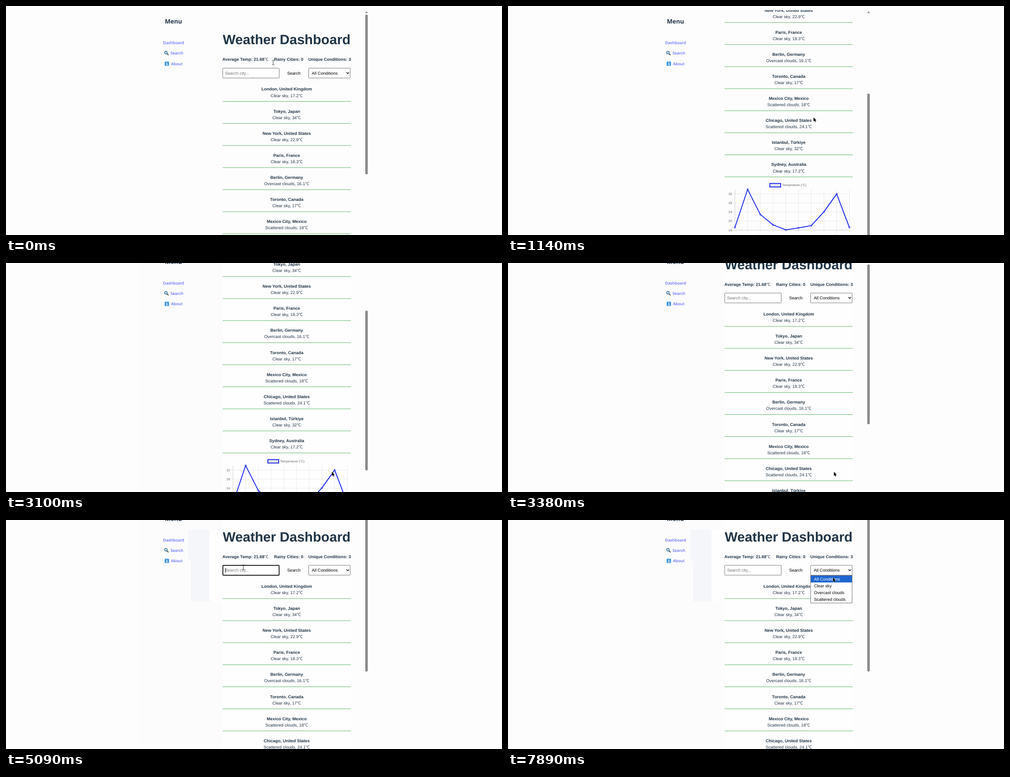
Animation, 1099 px wide and 510 px high, one loop 8000 ms. Source, as an HTML page:

```html
<!DOCTYPE html>
<html lang="en">
<head>
<meta charset="utf-8">
<title>Weather Dashboard</title>
<style>
  html, body { margin: 0; width: 100%; height: 100%; overflow: hidden; background: #fdfdfd; }
  svg { display: block; }
  text { font-family: "Liberation Sans", Arial, "Noto Sans CJK JP", sans-serif; font-size: 9.4px; fill: #213547; text-rendering: geometricPrecision; white-space: pre; }
  .bold { font-weight: 700; }
  .mid { text-anchor: middle; }
  .end { text-anchor: end; }
  .title { font-size: 30.05px; font-weight: 700; }
  .unit { font-family: "Noto Sans CJK JP", "DejaVu Sans", sans-serif; font-weight: 400; }
  .menu { font-family: "Open Sans", "Noto Sans", sans-serif; font-size: 13.4px; font-weight: 700; text-anchor: middle; }
  .link { font-family: "Open Sans", "Noto Sans", sans-serif; font-size: 8.8px; font-weight: 600; fill: #646cff; }
  .control { fill: #000; }
  .hint { fill: #757575; }
  .small { font-size: 7.03px; fill: #666; }
  .picked { fill: #fff; }
</style>
</head>
<body>
<svg id="stage" xmlns="http://www.w3.org/2000/svg" width="1099" height="510" viewBox="0 0 1099 510"></svg>
<script>
const LOOP = 8000;
const PAGE_SCROLL = 37.5;
const CITIES = [
  ["London", "United Kingdom", "Clear sky", 17.2],
  ["Tokyo", "Japan", "Clear sky", 34],
  ["New York", "United States", "Clear sky", 22.9],
  ["Paris", "France", "Clear sky", 18.3],
  ["Berlin", "Germany", "Overcast clouds", 16.1],
  ["Toronto", "Canada", "Clear sky", 17],
  ["Mexico City", "Mexico", "Scattered clouds", 18],
  ["Chicago", "United States", "Scattered clouds", 24.1],
  ["Istanbul", "Türkiye", "Clear sky", 32],
  ["Sydney", "Australia", "Clear sky", 17.2]
];

const stage = document.getElementById("stage");

function add(parent, tag, attrs = {}, content) {
  const node = document.createElementNS("http://www.w3.org/2000/svg", tag);
  for (const key in attrs) node.setAttribute(key, attrs[key]);
  if (content !== undefined) node.textContent = content;
  parent.appendChild(node);
  return node;
}
const group = (parent, attrs) => add(parent, "g", attrs);
const text = (parent, x, y, cls, content) => add(parent, "text", { x, y, class: cls }, content);
const rect = (parent, x, y, width, height, attrs) => add(parent, "rect", { x, y, width, height, ...attrs });
const path = (parent, d, attrs) => add(parent, "path", { d, fill: "none", ...attrs });

function degrees(parent, x, y, cls, content) {
  add(text(parent, x, y, cls, content), "tspan", { class: "unit" }, "℃");
}

function buildSidebar(g) {
  text(g, 371, 39, "menu", "Menu");
  text(g, 348, 85, "link", "Dashboard");
  text(g, 364.4, 108.3, "link", "Search");
  text(g, 365.4, 131.8, "link", "About");
  path(g, "M357 106.4 L359.4 108.9", { stroke: "#3c4650", "stroke-width": 2, "stroke-linecap": "round" });
  add(g, "circle", { cx: 354.4, cy: 103.8, r: 3.1, fill: "#a9dcf5", stroke: "#46627a", "stroke-width": 1.2 });
  rect(g, 351.6, 123.7, 9.6, 9.6, { rx: 1.2, fill: "#3f97dc" });
  path(g, "M355 127.4 H356.7 V131.2 M354.8 131.2 H358.2 M356.3 125 V126.1", { stroke: "#fff", "stroke-width": 1.2 });
}

function buildControls(g) {
  text(g, 621.8, 85.3, "title mid", "Weather Dashboard");
  degrees(g, 479.6, 122.3, "bold", "Average Temp: 21.68");
  text(g, 594, 122.3, "bold", "Rainy Cities: 0");
  text(g, 669.9, 122.3, "bold", "Unique Conditions: 3");
  const box = { rx: 1, fill: "#fff", stroke: "#767676", "stroke-width": 1 };
  rect(g, 480.2, 138.4, 125.2, 22, box);
  text(g, 485.4, 152.8, "hint", "Search city...");
  text(g, 637.8, 152.8, "control mid", "Search");
  rect(g, 670.6, 138.4, 92, 22, box);
  text(g, 677.6, 152.8, "control", "All Conditions");
  path(g, "M754.4 147.8 L757.2 150.6 L760 147.8", { stroke: "#000", "stroke-width": 1.4 });
}

function buildCities(g) {
  CITIES.forEach(([city, country, sky, temp], i) => {
    const y = i * 49.12;
    text(g, 622, 188.4 + y, "bold mid", `${city}, ${country}`);
    degrees(g, 622, 202.5 + y, "mid", `${sky}, ${temp}`);
    rect(g, 480, 212 + y, 284, 1, { fill: "#5cb768" });
  });
}

function buildChart(g) {
  const left = 502.8, right = 756.4, top = 682.4, bottom = 773.1;
  const xAt = i => left + i * (right - left) / 9;
  const yAt = temp => bottom - (temp - 16) * 5.03;
  const grid = { stroke: "#e4e4e4", "stroke-width": 0.8 };
  rect(g, 580.2, 669.2, 24, 7.8, { fill: "#e0e3ea", stroke: "#0a1cf0", "stroke-width": 1.8 });
  text(g, 607.4, 675.4, "small", "Temperature (°C)");
  for (let temp = 16; temp <= 32; temp += 4) {
    path(g, `M498 ${yAt(temp)} H${right}`, grid);
    text(g, 496.4, yAt(temp) + 2.4, "small end", temp);
  }
  CITIES.forEach(([city], i) => {
    path(g, `M${xAt(i)} ${top} V${bottom + 4.7}`, grid);
    add(g, "text", { class: "small end", transform: `translate(${xAt(i) + 1} ${bottom + 13.6}) rotate(-25)` }, city);
  });
  path(g, `M${left} ${top} V${bottom} H${right}`, { stroke: "#d4d4d4", "stroke-width": 0.8 });
  const points = CITIES.map((row, i) => [xAt(i), yAt(row[3])]);
  path(g, "M" + points.join(" L"), { stroke: "#0a1cf0", "stroke-width": 1.8, "stroke-linejoin": "round" });
  for (const [cx, cy] of points)
    add(g, "circle", { cx, cy, r: 1.7, fill: "#7f88ee", stroke: "#0a1cf0", "stroke-width": 0.8 });
}

function buildDropdown(g) {
  rect(g, 670.6, 123.5, 91.8, 61.4, { fill: "#fff", stroke: "#6e6e6e", "stroke-width": 1 });
  rect(g, 671, 124, 91, 15.1, { fill: "#1f66d0" });
  ["All Conditions", "Clear sky", "Overcast clouds", "Scattered clouds"].forEach((label, i) =>
    text(g, 678, 134.7 + i * 15.25, i ? "control" : "picked", label));
}

const backdrop = group(stage);
rect(backdrop, 293, 0, 187, 510, { fill: "#fcfcfd" });
rect(backdrop, 480, 0, 284, 510, { fill: "#fefefe" });
const shade = group(stage);
rect(shade, 410, 22, 41, 159, { fill: "#f5f6fa" });
rect(shade, 451, 22, 29, 159, { fill: "#fefefe" });
const shadeEdge = rect(stage, 404, 22, 6, 68, { fill: "#f5f6fa" });

const clip = add(add(stage, "defs"), "clipPath", { id: "view" });
rect(clip, 470, 9, 310, 542);

const page = group(stage);
buildSidebar(group(page));
const content = group(group(page, { "clip-path": "url(#view)" }));
buildControls(content);
buildCities(content);
buildChart(content);
path(page, "M795.8 15.8 L798.9 11.4 L802 15.8 Z", { fill: "#8b8b8b" });
const thumb = rect(page, 796, 19, 5.6, 356, { rx: 2.8, fill: "#8b8b8b" });

const focusRing = rect(stage, 480.6, 101.2, 124.6, 22, { rx: 1.5, fill: "none", stroke: "#101010", "stroke-width": 1.8 });
const caret = rect(stage, 486, 107, 1, 10, { fill: "#000" });
const dropdown = group(stage);
buildDropdown(dropdown);

const arrow = path(stage, "M0 0 V9.2 L2.1 7.2 L3.7 10.7 L5.2 10 L3.7 6.7 H6.4 Z",
  { fill: "#000", stroke: "#fff", "stroke-width": 0.8, "paint-order": "stroke" });
const beam = path(stage, "M-2.5 -5 H-0.6 L0 -4.4 L0.6 -5 H2.5 M0 -4.4 V4.4 M-2.5 5 H-0.6 L0 4.4 L0.6 5 H2.5",
  { stroke: "#222", "stroke-width": 0.9 });

// Bursts of motion: start, end, number of steps.
const BURSTS = [[140, 1140, 8], [1300, 2020, 6], [3100, 4090, 8], [4240, 5090, 7], [6710, 7600, 7], [7890, 7890, 1]];
// Keys: time, value(s).
const SCROLL = [[280, 0], [1140, 274], [2960, 274], [3380, 34], [3520, 0]];
const PAGE = [[1140, 0], [1440, PAGE_SCROLL]];
const POINTER = [
  [0, 592, 126], [560, 677, 248], [1440, 677, 248], [1580, 690, 303], [1730, 711, 353], [2020, 722, 465],
  [3520, 722, 465], [3940, 441, 163], [4090, 410, 22], [4240, 406, 26], [4380, 404, 73],
  [4660, 640, 100], [4800, 727, 106], [4950, 620, 107], [5090, 526, 105],
  [6560, 526, 105], [7000, 690, 114], [7150, 786, 116], [7300, 750, 114], [7450, 708, 110],
  [7600, 708, 110], [7890, 720, 128]
];

function lastStep(t) {
  let step = 0;
  for (const [start, end, count] of BURSTS)
    for (let i = 0; i < count; i++) {
      const at = Math.floor((start + (end - start) * i / Math.max(1, count - 1)) / 10) * 10;
      if (at <= t) step = at;
    }
  return step;
}

function track(keys, t) {
  const next = keys.findIndex(key => key[0] > t);
  if (next === 0) return keys[0].slice(1);
  if (next < 0) return keys[keys.length - 1].slice(1);
  const a = keys[next - 1], b = keys[next];
  const k = (t - a[0]) / (b[0] - a[0]);
  return a.slice(1).map((value, i) => value + (b[i + 1] - value) * k);
}

const show = (node, visible) => node.setAttribute("visibility", visible ? "visible" : "hidden");
const move = (node, x, y) => node.setAttribute("transform", `translate(${x} ${y})`);

function render(t) {
  const step = lastStep(t);
  const [scroll] = track(SCROLL, step);
  const [pageScroll] = track(PAGE, step);
  const [x, y] = track(POINTER, step);
  move(page, 0, -pageScroll);
  move(content, 0, -scroll);
  move(thumb, 0, scroll * 0.642);

  const open = step >= 7450;
  const typing = step >= 5090 && !open;
  show(backdrop, step >= 1300);
  show(shade, step >= 4090);
  show(shadeEdge, step >= 4380);
  show(focusRing, typing);
  show(caret, typing && (t < 5650 || t >= 6110));
  show(dropdown, open);

  const overText = step < 140 || step === 5090;
  show(beam, overText);
  show(arrow, !overText);
  move(overText ? beam : arrow, x, y);
}

const began = performance.now();
function tick() {
  render((performance.now() - began) % LOOP);
  requestAnimationFrame(tick);
}
tick();
</script>
</body>
</html>
```
